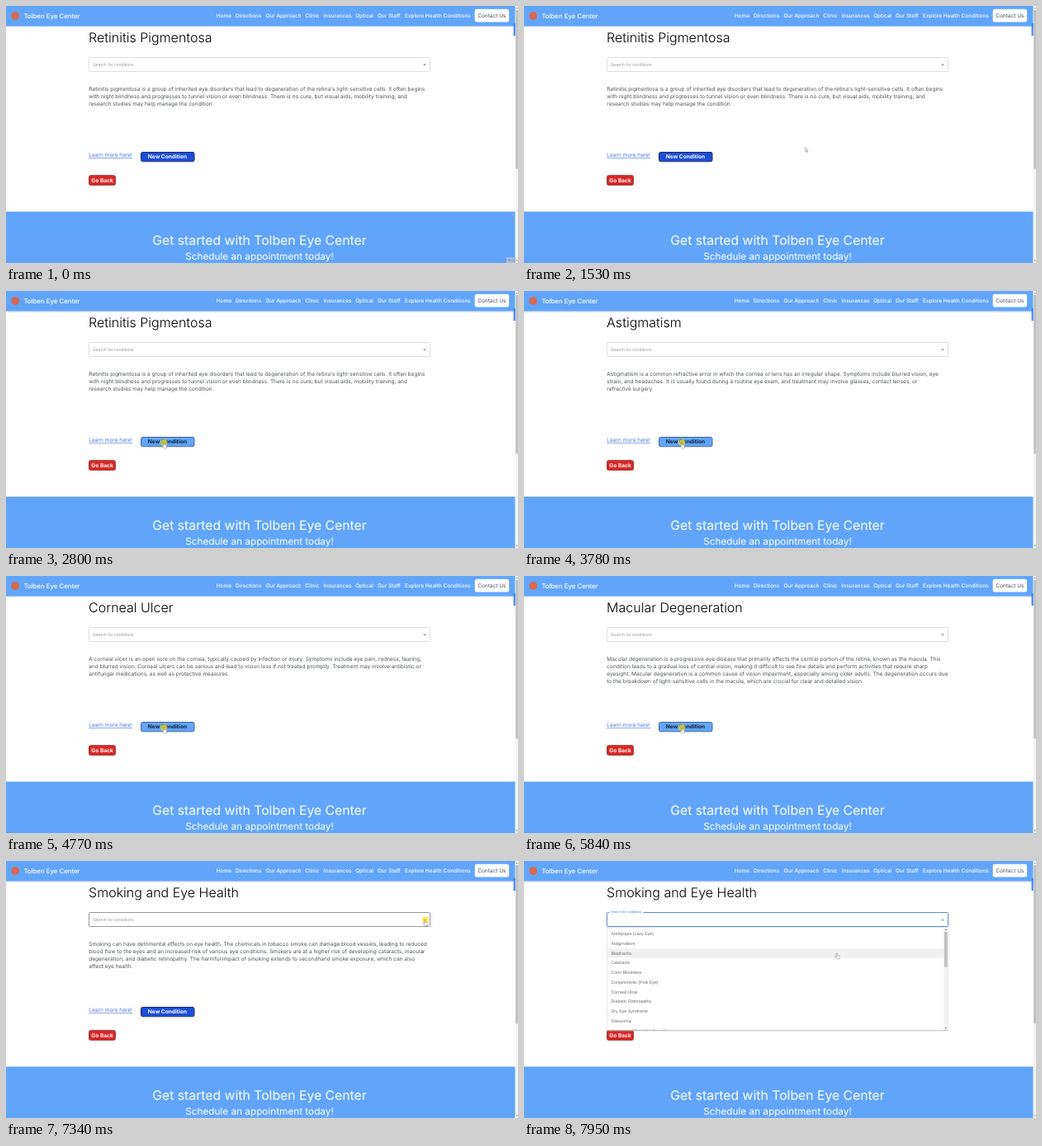
Recreate the animation shown at these times as an HTML page. Size 620 by 312 pixels, loop 8000 ms.

```html
<!DOCTYPE html>
<html lang="en">
<head>
<meta charset="utf-8">
<title>Eye conditions</title>
<style>
html, body { margin: 0; width: 100%; height: 100%; overflow: hidden; background: #fefefe; }
svg { display: block; width: 620px; height: 312px; }
text { font: 400 6.53px Inter, sans-serif; font-optical-sizing: none; text-rendering: geometricPrecision; white-space: pre; }
.white { fill: #fff; }
.nav text { font-size: 6.45px; font-weight: 500; }
.brand { font-size: 7.8px; font-weight: 500; }
.title { font-size: 16px; font-weight: 300; }
.cta { font-size: 15.75px; }
.sub { font-size: 11.77px; }
.mid { text-anchor: middle; }
.bold { font-size: 6.6px; font-weight: 700; }
.body { fill: #50555d; }
.link { fill: #4c74dc; text-decoration: underline; text-decoration-thickness: .5px; }
.mui { font: 5.3px "Liberation Sans", Arial, sans-serif; fill: #6a6a6a; }

/* One loop is 8 s, so 1% is 80 ms. */
.page, .tip, .click, .cursor, .arrow, .hand, .btn, .btn-text, .field, .popup, .row, .chevron, .notch {
  animation: 8s step-end infinite;
}
.label { animation: label 8s linear infinite; }

.page { opacity: 0; }
.p0 { animation-name: p0; }
.p1 { animation-name: p1; }
.p2 { animation-name: p2; }
.p3 { animation-name: p3; }
.p4 { animation-name: p4; }
@keyframes p0 { 0% { opacity: 1 } 35.75%, 100% { opacity: 0 } }
@keyframes p1 { 0% { opacity: 0 } 35.75% { opacity: 1 } 48.125%, 100% { opacity: 0 } }
@keyframes p2 { 0% { opacity: 0 } 48.125% { opacity: 1 } 61.25%, 100% { opacity: 0 } }
@keyframes p3 { 0% { opacity: 0 } 61.25% { opacity: 1 } 74.625%, 100% { opacity: 0 } }
@keyframes p4 { 0% { opacity: 0 } 74.625%, 100% { opacity: 1 } }

.tip { animation-name: tip; }
@keyframes tip { 0% { opacity: 1 } .875%, 100% { opacity: 0 } }

.click { fill: #ffe600; animation-name: click; }
@keyframes click {
  0%, 35.75%, 48.125%, 61.25%, 74.625%, 92.625%, 100% { opacity: 0 }
  35%, 47.25%, 59.625%, 73%, 90.875% { opacity: .68 }
}

.btn { animation-name: btn; }
.btn-text { animation-name: btn-text; }
@keyframes btn {
  0%, 79.75%, 100% { fill: #1d4ed8; stroke: #1a2d66 }
  30.5% { fill: #60a5fa; stroke: #4a6890 }
}
@keyframes btn-text { 0%, 79.75%, 100% { fill: #fff } 30.5% { fill: #16202f } }

.field { fill: #fff; animation-name: field; }
@keyframes field {
  0%, 85.875% { stroke: #dedede }
  84.125%, 87.5% { stroke: #999 }
  92.625%, 100% { stroke: #5a8cc8 }
}
.notch, .popup { animation-name: open; }
@keyframes open { 0% { opacity: 0 } 92.625%, 100% { opacity: 1 } }
.chevron { fill: #8c8c8c; transform-origin: 507px 71.4px; animation-name: flip; }
@keyframes flip { 0% { transform: none } 92.625%, 100% { transform: rotate(180deg) } }
@keyframes label {
  0%, 92.625% { transform: translate(105px, 72.7px); fill: #999; animation-timing-function: ease-out }
  95.125%, 100% { transform: translate(105px, 63px) scale(.75); fill: #5285c4 }
}
.row { fill: #f1f1f1; animation-name: row; }
@keyframes row {
  0% { opacity: 0; transform: none }
  95.1% { opacity: 1; transform: none }
  96.8% { opacity: 1; transform: translateY(11.75px) }
  98.5%, 100% { opacity: 1; transform: translateY(23.5px) }
}

.cursor { animation-name: move; }
@keyframes move {
  0% { transform: translate(612px, 306px); opacity: 0 }
  .875% { transform: translate(612px, 306px); opacity: 1; animation-timing-function: steps(5, jump-both) }
  5.125% { transform: translate(341px, 171.5px); opacity: 1 }
  19.125% { transform: translate(340.5px, 171.5px) }
  20% { transform: translate(340.5px, 171.5px); animation-timing-function: steps(4, jump-both) }
  23.5% { transform: translate(245px, 162.5px) }
  24.375% { transform: translate(245px, 162.5px); animation-timing-function: steps(5, jump-both) }
  28.75% { transform: translate(157.5px, 173.5px) }
  29.625% { transform: translate(157.5px, 173.5px); animation-timing-function: steps(3, jump-both) }
  32.25% { transform: translate(191px, 183.5px) }
  77.125% { transform: translate(191px, 183.5px); animation-timing-function: steps(2, jump-both) }
  78.875% { transform: translate(215px, 178px) }
  79.75% { transform: translate(215px, 178px); animation-timing-function: steps(5, jump-both) }
  84.125% { transform: translate(490px, 74px) }
  85% { transform: translate(490px, 74px); animation-timing-function: steps(1, jump-both) }
  85.875% { transform: translate(513.5px, 70px) }
  87.5% { transform: translate(513.5px, 70px); animation-timing-function: steps(1, jump-both) }
  88.375% { transform: translate(507.5px, 71px) }
  93.375% { transform: translate(507.5px, 71px); animation-timing-function: steps(7, jump-both) }
  99.375%, 100% { transform: translate(378.7px, 111.5px); opacity: 1 }
}
.arrow, .hand { fill: #fff; stroke: #666; stroke-width: .5px; stroke-linejoin: round; }
.arrow { animation-name: arrow; }
.hand { animation-name: hand; }
@keyframes arrow { 0%, 79.75% { opacity: 1 } 30.5%, 87.5%, 100% { opacity: 0 } }
@keyframes hand { 0%, 79.75% { opacity: 0 } 30.5%, 87.5%, 100% { opacity: 1 } }
</style>
</head>
<body>
<svg viewBox="0 0 620 312">
  <defs>
    <linearGradient id="shade" x2="0" y2="1">
      <stop stop-color="#9db8dc" stop-opacity=".7"/>
      <stop offset="1" stop-color="#9db8dc" stop-opacity="0"/>
    </linearGradient>
    <clipPath id="list"><rect x="100" y="80" width="414" height="125.6"/></clipPath>
  </defs>
  <rect width="620" height="312" fill="#fefefe"/>

  <rect y="24" width="616.7" height="2.5" fill="url(#shade)"/>
  <rect width="616.7" height="24.3" fill="#60a5fa"/>
  <circle cx="11.2" cy="12" r="5" fill="#d8694f"/>
  <text class="brand white" x="21.4" y="14.6">Tolben Eye Center</text>
  <g id="nav" class="nav white"></g>
  <rect x="567.7" y="3.7" width="41.4" height="15.9" rx="2.4" fill="#fff"/>
  <text x="571.2" y="14.2" fill="#4b5058">Contact Us</text>

  <g id="pages"></g>

  <rect class="field" x="100.5" y="62.5" width="413" height="17" rx=".8"/>
  <rect class="notch" x="103.5" y="61" width="41" height="3" fill="#fefefe"/>
  <text class="mui label">Search for conditions</text>
  <path class="chevron" d="M505 70.4h4l-2 2z"/>

  <text class="link" x="100.3" y="183.4">Learn more here!</text>
  <rect class="btn" x="163.5" y="177.5" width="64.5" height="11.3" rx="2"/>
  <text class="bold mid btn-text" x="195.5" y="185.4">New Condition</text>
  <rect x="100.5" y="205.7" width="32" height="11.8" rx="2" fill="#dc2626" stroke="#96403e"/>
  <text class="bold mid white" x="116.6" y="214">Go Back</text>

  <rect y="249" width="616.7" height="1" fill="#c9d8ec"/>
  <rect y="250" width="616.7" height="62" fill="#60a5fa"/>
  <text class="cta mid white" x="307" y="290">Get started with Tolben Eye Center</text>
  <text class="sub mid white" x="307" y="308.2">Schedule an appointment today!</text>

  <g class="popup">
    <rect x="100.4" y="80.4" width="413" height="125.4" fill="#fff" stroke="#dcdcdc" stroke-width=".7"/>
    <g clip-path="url(#list)">
      <rect class="row" x="100.7" y="82.6" width="408" height="11.75"/>
      <g id="options"></g>
    </g>
    <rect x="508.5" y="80.8" width="4.7" height="124.6" fill="#f1f1f1"/>
    <rect x="508.8" y="86" width="4" height="42.8" fill="#c1c1c1"/>
    <path d="M509.6 84h2.4l-1.2-1.5zM509.6 202h2.4l-1.2 1.5z" fill="#666"/>
    <path d="M100.4 205.8h413" stroke="#a8a8a8" stroke-width=".7"/>
  </g>

  <rect x="616.7" width="3.3" height="312" fill="#f3f3f3"/>
  <rect x="617.2" y="5" width="2.8" height="192.5" fill="#c1c1c1"/>
  <path d="M617.5 3.2h2.2l-1.1-1.5zM617.5 308.5h2.2l-1.1 1.5z" fill="#888"/>
  <rect x="614.6" y="21" width="2.1" height="15.2" fill="#3b82f6"/>
  <g class="tip">
    <rect x="606" y="305" width="11.2" height="7" fill="#a9bfe2"/>
    <text x="607.4" y="310.4" style="font-size:4px" fill="#6d83b0">Stop</text>
  </g>

  <g class="cursor">
    <circle class="click" cx=".2" cy=".5" r="4.1"/>
    <path class="arrow" d="M0 0v5.2l1.2-1 .9 2 .9-.4-.9-1.9h1.6z"/>
    <path class="hand" d="M-.6.6q.6-.9 1.2 0v2.5l2.4.5q.8.2.7 1.1l-.5 2.9h-3.5l-2-2.6q-.1-1 1-.4l.7.5z"/>
  </g>
</svg>
<script>
const text = (x, y, s, cls = '') => `<text class="${cls}" x="${x}" y="${y}">${s}</text>`;
const fill = (id, items) => document.getElementById(id).innerHTML = items.join('');

const nav = { Home: 254.8, Directions: 278, 'Our Approach': 314.4, Clinic: 362.3, Insurances: 384.5,
  Optical: 423.2, 'Our Staff': 449.9, 'Explore Health Conditions': 483 };

const pages = [
  ['Retinitis Pigmentosa',
    "Retinitis pigmentosa is a group of inherited eye disorders that lead to degeneration of the retina's light-sensitive cells. It often begins",
    'with night blindness and progresses to tunnel vision or even blindness. There is no cure, but visual aids, mobility training, and',
    'research studies may help manage the condition.'],
  ['Astigmatism',
    'Astigmatism is a common refractive error in which the cornea or lens has an irregular shape. Symptoms include blurred vision, eye',
    'strain, and headaches. It is usually found during a routine eye exam, and treatment may involve glasses, contact lenses, or',
    'refractive surgery.'],
  ['Corneal Ulcer',
    'A corneal ulcer is an open sore on the cornea, typically caused by infection or injury. Symptoms include eye pain, redness, tearing,',
    'and blurred vision. Corneal ulcers can be serious and lead to vision loss if not treated promptly. Treatment may involve antibiotic or',
    'antifungal medications, as well as protective measures.'],
  ['Macular Degeneration',
    'Macular degeneration is a progressive eye disease that primarily affects the central portion of the retina, known as the macula. This',
    'condition leads to a gradual loss of central vision, making it difficult to see fine details and perform activities that require sharp',
    'eyesight. Macular degeneration is a common cause of vision impairment, especially among older adults. The degeneration occurs due',
    'to the breakdown of light-sensitive cells in the macula, which are crucial for clear and detailed vision.'],
  ['Smoking and Eye Health',
    'Smoking can have detrimental effects on eye health. The chemicals in tobacco smoke can damage blood vessels, leading to reduced',
    'blood flow to the eyes and an increased risk of various eye conditions. Smokers are at a higher risk of developing cataracts, macular',
    'degeneration, and diabetic retinopathy. The harmful impact of smoking extends to secondhand smoke exposure, which can also',
    'affect eye health.'],
];

const options = ['Amblyopia (Lazy Eye)', 'Astigmatism', 'Blepharitis', 'Cataracts', 'Color Blindness',
  'Conjunctivitis (Pink Eye)', 'Corneal Ulcer', 'Diabetic Retinopathy', 'Dry Eye Syndrome', 'Glaucoma',
  'Hyperopia (Farsightedness)'];

fill('nav', Object.entries(nav).map(([s, x]) => text(x, 14.2, s)));
fill('pages', pages.map(([title, ...lines], i) => `<g class="page p${i}">` + text(100.1, 44.2, title, 'title') +
  lines.map((s, n) => text(100.3, 102.6 + n * 9.15, s, 'body')).join('') + '</g>'));
fill('options', options.map((s, i) => text(105.5, 90.2 + i * 11.75, s, 'mui')));
</script>
</body>
</html>
```
